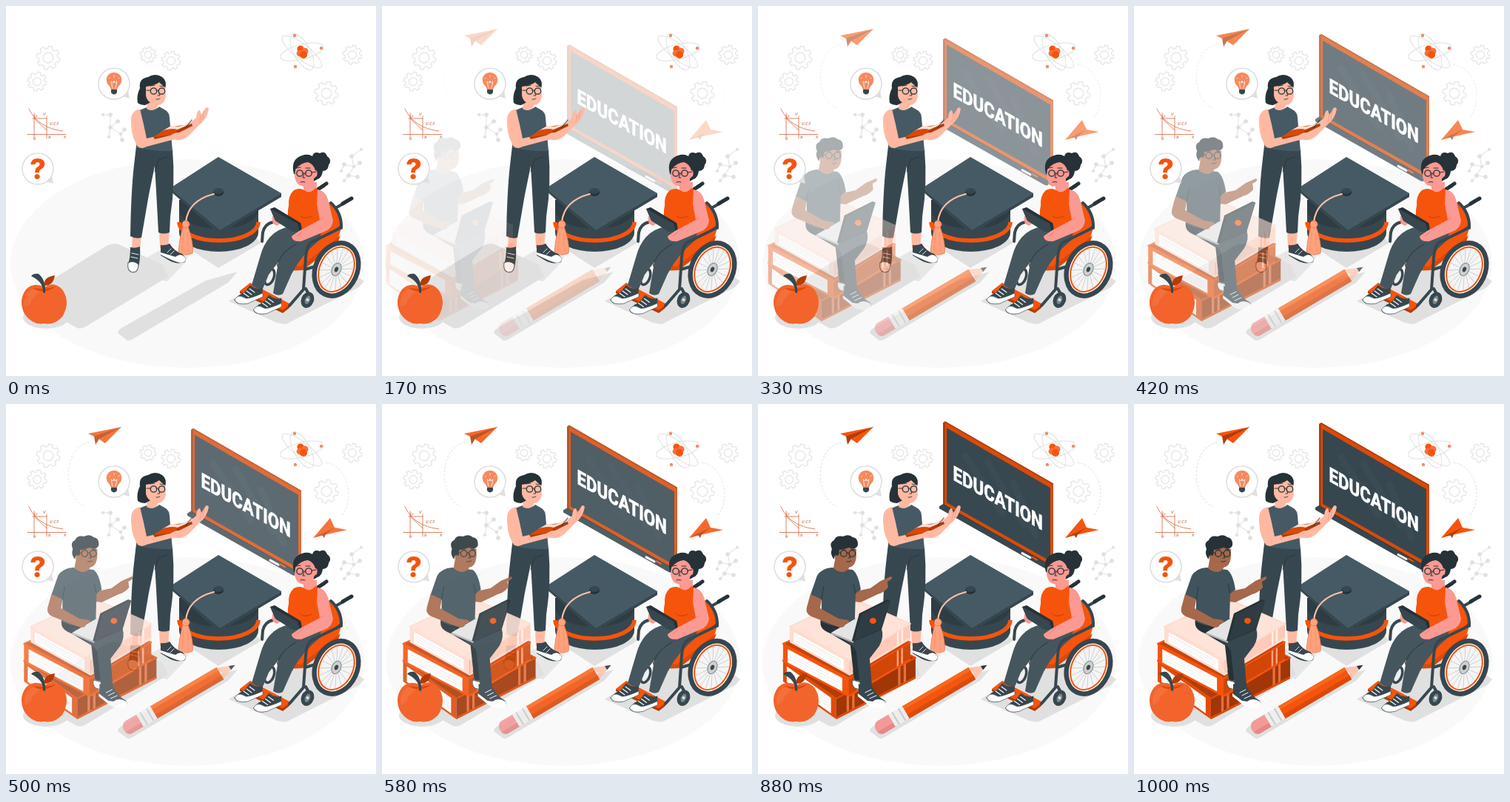
Write an HTML page that moves like this. It is 500x500 px and loops after 1040 ms.

```html
<!DOCTYPE html>
<html lang="en">
<head>
<meta charset="utf-8">
<title>Education</title>
<style>
html, body { margin: 0; width: 100%; height: 100%; overflow: hidden; background: #fff; }
svg { display: block; width: 100vw; height: 100vh; }
path, ellipse, circle, line { stroke-linecap: round; stroke-linejoin: round; }
.dark { fill: #37474f; }
.slate { fill: #455a64; }
.ink { fill: #263238; }
.org { fill: #f6540c; }
.burnt { fill: #d94a0a; }
.rust { fill: #b23c08; }
.peach { fill: #ffa27c; }
.pale { fill: #ffdccf; }
.white { fill: #fff; }
.shade { fill: #e0e0e0; }
.skinA { fill: #ffb9a3; }
.skinB { fill: #a6684c; }
.skinC { fill: #fb9a92; }
.grey { fill: none; stroke: #e0e0e0; }
.line { fill: none; stroke: #263238; }
.light { fill: none; stroke: #fff; }
.dash { fill: none; stroke: #dcdcdc; stroke-dasharray: 2 3; }
.tube { fill: none; stroke: #37474f; stroke-width: 4; }
.bubble { fill: #fff; stroke: #dedede; stroke-width: 1.6; }
.chalk { fill: none; stroke: #d9653d; stroke-width: .8; }
.note { font: italic 6px "Open Sans", sans-serif; fill: #b5502a; }
</style>
</head>
<body>
<svg viewBox="0 0 500 500">
<ellipse cx="245" cy="348" rx="239" ry="141" fill="#f9f9f9"/>

<g class="shade">
  <path d="M60 371L136 324Q144 320 152 322L212 350 219 366 108 433Q102 437 96 435L60 415Z"/>
  <path d="M165 354L215 326 247 338 240 349 218 372 170 362Z" opacity=".7"/>
  <path d="M232 318L287 354 345 320 330 305Z"/>
  <path d="M151 442Q152 437 158 434L270 371 313 359 300 374 178 446Q168 453 164 452Z"/>
  <path d="M301 399L340 375 400 345 450 348 484 372 477 380 378 430 366 428Z"/>
  <ellipse cx="54" cy="421" rx="31" ry="15"/>
</g>

<g id="gears" class="grey"></g>

<!-- atom -->
<g transform="translate(400 62)">
  <g class="grey">
    <ellipse rx="30" ry="10" transform="rotate(-14)"/>
    <ellipse rx="33" ry="10" transform="rotate(38)"/>
    <ellipse rx="27" ry="11" transform="rotate(62)"/>
  </g>
  <g class="org">
    <circle cx="-2" cy="-4" r="4.6"/><circle cx="4" cy="-1" r="4.6" fill="#f7703a"/>
    <circle cx="-3" cy="2" r="4.4" fill="#f7703a"/><circle cx="2" cy="4" r="5"/>
  </g>
  <g fill="#f08a68"><circle cx="-10" cy="-22" r="2.2"/><circle cx="26" cy="-5" r="2.2"/><circle cx="-9" cy="20" r="2.2"/></g>
</g>

<g id="molecules"></g>

<!-- graph -->
<path class="chalk" d="M31 139Q43 165 77 169M38 145V179M55 149V179M29 173.5H81M36 152H55M38 152L55 168"/>
<g class="note">
  <text x="59" y="161">V-C3</text><text x="50" y="148">V</text><text x="38" y="151">U</text>
  <text x="78" y="179">X</text><text x="37" y="181">o</text><text x="57" y="179">b</text>
</g>

<!-- paper planes -->
<g class="fade">
  <path class="dash" d="M112 52C76 60 76 125 106 138M432 79C465 85 471 130 453 152"/>
  <path class="org" d="M111 40L156 31 134 53 125 47Z"/>
  <path class="rust" d="M119 43.500L156 31 126 47 121 55Z"/>
  <path class="org" d="M415 181L438 154 444 167 461 170 430 177Z"/>
  <path class="rust" d="M415 181L444 167 432 176 430 181 427 177Z"/>
</g>

<!-- blackboard -->
<g id="board" class="fade">
  <path class="rust" d="M250 27L253 25 399 109V226L250 141Z"/>
  <path class="burnt" d="M253 27L399 111V226L253 141Z"/>
  <path class="dark" d="M255 34L395 115V214L255 135Z"/>
  <path fill="none" stroke="#455a64" stroke-width="9" opacity=".25" d="M280 72L330 150M310 80L360 165M345 108L375 180"/>
  <path class="dark" d="M245 140L250 137 392 218 392 224 388 224 245 143Z"/>
  <path d="M251 138L392 218" class="line" stroke-width=".8"/>
  <path d="M357 203.500L368 209.500" class="light" stroke-width="3"/>
  <path d="M371 209L377 212.500" stroke="#f6540c" stroke-width="2"/>
  <text transform="matrix(.81 .46 0 1 263.500 104)" font-family="Roboto, sans-serif" font-weight="700" font-size="27.500" fill="#fff" stroke="#fff" stroke-width=".8">EDUCATION</text>
</g>

<!-- graduation cap -->
<path class="dark" d="M234 262V306A53.500 26 0 0 0 341 306V262Z"/>
<path d="M234 292A53.500 25 0 0 0 341 292" fill="none" stroke="#f6540c" stroke-width="5.500" style="stroke-linecap:butt"/>
<path d="M234 276A53.500 25 0 0 0 341 276V262H234Z" class="ink" opacity=".5"/>
<path class="dark" d="M222 246V250L288 308 372 258V253L288 280Z"/>
<path class="slate" d="M222 246L287 204 372 253 289 302Z"/>
<path d="M222 246L289 302 372 253" fill="none" stroke="#546870" stroke-width=".7"/>
<ellipse cx="287" cy="252" rx="7" ry="5" class="ink"/>
<ellipse cx="287" cy="250" rx="6.500" ry="4" class="dark"/>
<path d="M281 254Q246 263 243 292" fill="none" stroke="#ffbfaa" stroke-width="2.200"/>
<path class="peach" d="M239 298H246Q254 322 252 334Q243 339 233 333Q234 317 239 298Z" stroke="#f0774e" stroke-width=".8"/>
<circle cx="243" cy="295" r="5" class="peach" stroke="#f0774e" stroke-width=".8"/>
<path d="M240 306L238 331M245 306L247 333" stroke="#f0906f" stroke-width=".8"/>

<!-- teacher -->
<g>
  <path class="skinA" d="M171 308H183L181 330H170ZM207 303H221L219 327H208Z"/>
  <path class="dark" d="M168 326Q175 328 181 325Q182 342 179 352Q178 361 171 360Q163 359 165 349Q168 340 168 326Z"/>
  <path class="white" d="M165 347Q172 343 179 349Q179 360 171 360Q163 358 165 347Z" stroke="#37474f" stroke-width=".8"/>
  <path class="dark" d="M209 323Q216 324 221 321Q228 332 238 335Q245 341 242 346Q230 350 219 343L209 337Z"/>
  <path class="white" d="M229 339Q236 333 242 340Q245 346 236 347Q228 346 209 336V333Z"/>
  <path class="light" stroke-width=".9" d="M170 334L179 336M169 339L178 341M218 333L223 328M222 336L227 331"/>
  <path class="dark" d="M176 189L225 194Q229 240 222 285L221 306Q213 309 206 306L203 250 201 216 193 255 183 313Q175 315 168 311Q169 250 173 215Z"/>
  <path class="line" d="M201 224L206 208L217 204" stroke-width=".8"/>
  <path class="skinA" d="M226 180Q236 184 246 176L262 160Q272 152 274 139Q271 134 268 141L264 147 262 141Q258 140 257 151L243 163 222 172Z"/>
  <path d="M264 147L262 157M268 141L266 153" fill="none" stroke="#ef9480" stroke-width=".8"/>
  <path class="slate" d="M190 137Q200 143 207 136L216 141Q221 145 221 151Q223 175 225 196Q198 197 176 191Q175 165 180 141Z"/>
  <path class="skinA" d="M191 124H205V136Q200 144 190 139Z"/>
  <path class="ink" d="M178 131Q176 121 181 111Q179 98 192 96Q202 90 211 96Q218 101 215 112L214 120 188 134Q182 134 178 131Z"/>
  <path class="skinA" d="M189 109Q202 107 207 103Q212 108 215 110L216 123Q213 134 205 134Q191 132 189 121Z"/>
  <path class="line" d="M190 114L195 114M203 114H206" stroke-width="1.200"/>
  <circle class="line" cx="199.500" cy="115" r="4.200" stroke-width="1.300"/>
  <circle class="line" cx="210.500" cy="115" r="4.200" stroke-width="1.300"/>
  <path class="line" d="M195 108L201 107M208 108L213 109M203 126Q206 127 208 125M206 116L208 121H205" stroke-width=".9"/>
  <path class="skinA" d="M181 139Q171 141 169 151Q168 172 176 187Q180 195 190 190L228 180Q237 176 234 171L228 170 190 179 186 160Z"/>
  <path class="rust" d="M199 177L220 164 251 159 252 162 230 173 201 180Z"/>
  <path class="pale" d="M211 169L223 162Q236 165 246 157L250 159 232 167Q220 165 211 169Z"/>
  <path class="burnt" d="M199 177L213 168Q222 165 232 167L228 174Z"/>
  <path class="skinA" d="M221 176Q230 169 237 172L234 178 226 181Z"/>
  <path d="M243 164L251 154" class="line" stroke-width="1.500" opacity=".6"/>
</g>

<!-- pencil -->
<g class="fade" transform="translate(172 432.500) rotate(-30.500)">
  <path class="org" d="M30 -9H136V10H30Z"/>
  <path fill="#f7691f" d="M30 -9H136V-4H30Z"/>
  <path class="burnt" d="M30 4H136V10H30Z"/>
  <path fill="#ffc3ae" d="M135 -9L158 1 135 10Q139 7 136 5Q140 0 136 -4Q138 -7 135 -9Z"/>
  <path class="ink" d="M151 -2.200L159 1 151 4Z"/>
  <path fill="#f29a98" d="M12 -9H-8Q-15 -7 -15 1Q-15 9 -8 10H12Z"/>
  <path fill="#e58885" d="M12 4H-14Q-13 9 -8 10H12Z"/>
  <path fill="#eee" d="M10 -9H32V10H10Z"/>
  <path d="M16 -9V10M26 -9V10" stroke="#c9c9c9" stroke-width="2" style="stroke-linecap:butt"/>
</g>

<!-- student on books -->
<g id="student">
  <g id="books"></g>
  <path class="skinB" d="M126 360H139V378L128 380Z"/>
  <path class="white" d="M126 373L137 376V386L129 384Q124 379 126 373Z" stroke="#37474f" stroke-width=".8"/>
  <path class="ink" d="M84 288Q78 304 96 310L123 326 128 372Q132 375 138 373L143 335 160 310 130 290Z"/>
  <path class="dark" d="M98 302L126 318 165 303Q169 315 162 327L149 344 152 380Q144 384 136 381L131 335Q128 326 118 322Z"/>
  <path class="dark" d="M134 378Q144 384 151 379Q158 395 170 401Q174 408 165 410Q150 411 144 402L134 394Z"/>
  <path class="white" d="M153 402Q160 396 170 402Q174 409 164 411Q150 411 143 403L133 395V391L146 401Z"/>
  <path class="light" d="M143 390L151 386M146 394L154 390M149 398L158 394" stroke-width="1"/>
  <path class="skinB" d="M129 253L136 252 150 249 164 239 178 233Q182 236 173 240L174 248Q168 255 160 257L137 268 128 267Z"/>
  <path fill="#41535c" d="M98 221Q84 222 78 232L69 258 84 265 84 294Q105 306 129 292L130 256 137 251Q134 230 126 224Z"/>
  <path class="line" d="M84 264L87 247M130 256L127 243" stroke-width=".8"/>
  <path class="skinB" d="M103 206H121V222Q113 232 100 222Z"/>
  <path class="skinB" d="M102 198Q115 190 131 196V206Q130 220 120 221Q106 220 102 208Z"/>
  <path class="ink" d="M101 210Q95 203 98 196Q94 187 101 184Q104 177 113 179Q121 175 126 180Q134 181 133 191Q130 198 121 194Q112 197 108 197L107 205Q101 202 101 210Z"/>
  <circle class="line" cx="114" cy="202" r="4.300" stroke-width="1.300"/>
  <circle class="line" cx="125.500" cy="202" r="4.300" stroke-width="1.300"/>
  <path class="line" d="M103 201L110 201M118 201H121M121 203L123 208H120M110 196H116M124 196L129 197M118 213Q121 214 124 212" stroke-width="1"/>
  <path fill="#e4e4e4" d="M97 309L130 290 165 304 127 321Z"/>
  <path fill="#bdbdbd" d="M97 309L127 321V323L97 311Z"/>
  <path class="ink" d="M125 320L135 283 173 264 177 266 165 305 128 321Z"/>
  <path fill="#2f3c43" d="M128 320L138 284 177 265 165 304Z"/>
  <ellipse cx="153.500" cy="293" rx="4.500" ry="4" class="org"/>
  <path class="skinB" d="M69 257L84 264 82 276 107 290 120 292Q124 295 116 297Q116 302 109 302Q102 300 98 298L70 287Q62 283 64 275Z"/>
</g>

<!-- speech bubbles -->
<path class="shade" d="M157 122L167 125 165 114ZM53 237L64 240 62 230Z"/>
<circle class="bubble" cx="146" cy="105" r="21"/>
<circle class="bubble" cx="43" cy="220" r="21"/>
<path fill="#f68a5f" d="M141.500 112Q141 109 138.500 107A10.300 10.300 0 1 1 153.500 107Q151 109 150.500 112Z"/>
<path class="light" d="M144 111L142 102L145 104L146 101L147 104L150 102L148 111M146 96V94M140 98L139 97M152 98L153 97" stroke-width=".8"/>
<path class="dark" d="M142 112.500H150V117Q146 122 142 117Z"/>
<text x="43" y="233.500" text-anchor="middle" font-family="Inter, sans-serif" font-weight="800" font-size="38" fill="#f6540c">?</text>

<!-- apple -->
<path fill="#f2642c" d="M52 380Q65 371 76 383Q88 400 76 420Q65 432 52 429Q36 432 25 416Q16 398 27 383Q38 372 52 380Z"/>
<path fill="#f67a48" d="M29 388Q38 378 50 384Q40 388 34 400Q29 408 25 405Q24 396 29 388Z" opacity=".5"/>
<path d="M36 381Q51 391 67 379Q52 384 36 381Z" class="burnt"/>
<path class="dark" d="M50 387Q51 373 34 365Q37 361 44 362Q54 370 53 388Z"/>
<path class="rust" d="M52 378Q50 366 66 364Q64 378 52 378Z"/>

<!-- wheelchair user -->
<g>
  <ellipse cx="356" cy="366" rx="6" ry="11" transform="rotate(20 356 366)" fill="#eee" stroke="#37474f" stroke-width="3.500"/>
  <path class="org" d="M316 385L330 374 383 402 383 407 374 414Z"/>
  <path class="rust" d="M316 385L374 411 383 404V408L374 415 316 388Z"/>
  <path class="tube" d="M418 250L430 243M440 276L456 267"/>
  <path d="M421 248L433 240M455 267L467 260" class="line" stroke-width="5"/>
  <path class="org" d="M432 263L441 268Q455 280 454 297L447 320 400 356Q378 358 366 350L385 318Z"/>
  <path class="burnt" d="M366 348L398 352 452 310 448 321 401 357Q378 359 366 352Z"/>
  <path class="tube" d="M346 318L347 306Q350 294 361 292M439 266Q454 280 453 300"/>
  <path class="skinC" d="M402 238H420V252Q410 258 402 250Z"/>
  <path class="org" d="M389 249Q397 245 403 249Q411 255 418 246L425 251Q430 275 428 302Q405 310 383 300Q379 282 382 270Q381 256 389 249Z"/>
  <path fill="#46565e" d="M383 298Q352 304 343 340L332 377Q339 383 347 382L355 363 368 346 361 388Q368 393 374 389L386 362Q400 335 424 316L427 300Q405 306 383 298Z"/>
  <path class="line" d="M368 346Q375 330 392 322" stroke-width=".9"/>
  <g id="shoe">
    <path class="dark" d="M330 377Q338 384 347 381L346 393 327 402Q312 405 309 398Q312 391 322 387Z"/>
    <path class="white" d="M309 397Q313 389 322 394Q325 398 347 388V393L327 402Q312 405 309 397Z" stroke="#37474f" stroke-width=".6"/>
    <path class="light" d="M321 388L328 393M325 385L332 390M329 382L336 387" stroke-width="1.100"/>
  </g>
  <use href="#shoe" x="25.500" y="13.500"/>
  <path class="ink" d="M389 227Q384 207 400 202Q408 199 414 203Q416 196 424 199Q431 195 434 203Q441 208 436 215Q435 223 428 223Q427 232 421 234L414 238Z"/>
  <path class="skinC" d="M391 221Q398 212 408 211Q416 214 418 222Q422 222 420 230Q415 232 416 237Q411 244 402 244Q391 242 390 230Z"/>
  <circle class="line" cx="397" cy="226" r="4.200" stroke-width="1.300"/>
  <circle class="line" cx="409" cy="226" r="4.200" stroke-width="1.300"/>
  <path class="line" d="M401 226H405M413 225L419 224M403 227L401 232H404M393 219L398 218M405 219L411 219M398 238Q401 237 404 238" stroke-width="1"/>
  <path class="skinC" d="M360 284Q366 279 372 284L374 292 366 297Q358 295 360 284Z"/>
  <path class="ink" d="M357 274L363 272 398 293Q401 300 398 306L386 304 364 290Z"/>
  <path class="dark" d="M357 274L394 294 397 306 386 304 364 290Z"/>
  <path class="skinC" d="M421 248Q433 250 436 265L442 290Q441 301 430 305L399 318Q386 319 386 311L396 304 424 289 420 268Z"/>
  <path d="M424 289L429 286M400 305L393 311" fill="none" stroke="#e07766" stroke-width=".8"/>
  <path d="M398 284Q405 289 413 284" fill="none" stroke="#b23c08" stroke-width=".8"/>
  <path class="tube" d="M453 297Q452 300 446 303L413 319Q406 324 405 340L402 383 383 405M404 356L428 349M405 382L409 389"/>
  <g transform="translate(446.500 356) rotate(25)">
    <ellipse rx="28" ry="37" fill="#fff" stroke="#37474f" stroke-width="6.500"/>
    <ellipse rx="22.500" ry="31.500" fill="#f5f5f5" stroke="#f6540c" stroke-width="2"/>
    <g id="spokes" stroke="#c4c4c4" stroke-width=".7"></g>
    <ellipse rx="6" ry="9" fill="#cfcfcf" stroke="#78868c"/>
    <ellipse rx="2.500" ry="3.500" class="dark"/>
  </g>
  <ellipse cx="407.500" cy="397" rx="6" ry="8.500" transform="rotate(22 407 397)" fill="#78868c" stroke="#37474f" stroke-width="5"/>
  <circle cx="407.500" cy="397" r="2" fill="#e0e0e0"/>
</g>
</svg>

<script>
const $ = id => document.getElementById(id);
const polar = (r, a) => `${(r * Math.cos(a)).toFixed(2)} ${(r * Math.sin(a)).toFixed(2)}`;

function gear(x, y, r) {
  const teeth = 8, step = 2 * Math.PI / teeth;
  let d = "";
  for (let i = 0; i < teeth; i++) {
    const a = i * step;
    d += `${i ? "L" : "M"}${polar(r * .78, a - .25)}L${polar(r, a - .17)}L${polar(r, a + .17)}L${polar(r * .78, a + .25)}`;
  }
  return `<g transform="translate(${x} ${y}) rotate(12)"><path d="${d}Z"/><circle r="${r * .43}"/></g>`;
}
$("gears").innerHTML = [[57, 70, 16], [42, 102, 13], [192, 66, 11], [223, 74, 13], [433, 118, 16], [468, 66, 13]]
  .map(g => gear(...g)).join("");

// Each chain is a run of bonded nodes.
const chains = [
  [[131, 147], [141, 147], [141, 164], [151, 156]],
  [[139, 177], [141, 164], [155, 173], [160, 167]],
  [[155, 173], [157, 181]],
  [[480, 194], [467, 203], [470, 217], [463, 229], [457, 236]],
  [[453, 223], [457, 214], [470, 217], [478, 212]],
  [[463, 229], [475, 231]]
];
$("molecules").innerHTML = chains.map(c => `<polyline class="grey" points="${c.join(" ")}"/>` +
  c.map(([x, y], i) => `<circle class="shade" cx="${x}" cy="${y}" r="${i % 2 ? 2.8 : 2.1}"/>`).join("")).join("");

$("spokes").innerHTML = Array.from({ length: 18 }, (_, i) => {
  const a = i * Math.PI / 9;
  return `<line x2="${21 * Math.cos(a)}" y2="${30 * Math.sin(a)}"/>`;
}).join("");

// Corners are left, front, right and back of the cover; h is the thickness.
function book(l, f, r, b, h, top, edge, spine, band) {
  const at = (p, q, k, dy) => `${p[0] + (q[0] - p[0]) * k} ${p[1] + (q[1] - p[1]) * k + dy}`;
  const face = (p, q, k0, k1, y0, y1, fill) =>
    `<path fill="${fill}" d="M${at(p, q, k0, y0)}L${at(p, q, k1, y0)}L${at(p, q, k1, y1)}L${at(p, q, k0, y1)}Z"/>`;
  const bands = [.13, .2, .78, .85].map(k => face(f, r, k, k + .03, 1, h - 1, band)).join("");
  const leaves = [.35, .5, .65].map(k => face(l, f, .1, .85, h * k, h * k + .6, "#dedede")).join("");
  return face(l, f, 0, 1, 0, h, edge) + face(l, f, .07, .9, 4, h - 3, "#fff") + leaves +
    face(f, r, 0, 1, 0, h, spine) + bands + face(f, r, 0, 1, h - 3, h, edge) +
    `<path fill="${top}" stroke="${edge}" stroke-width="2" d="M${l}L${f}L${r}L${b}Z"/>`;
}
$("books").innerHTML =
  book([32, 347], [104, 398], [211, 343], [125, 300], 28, "#b23c08", "#e04c0a", "#a13607", "#e8703c") +
  book([32, 324], [121, 371], [204, 322], [118, 285], 25, "#c8430a", "#f6540c", "#d04708", "#ffa27c") +
  book([41, 301], [122, 346], [204, 297], [124, 262], 21, "#ffe3d8", "#ffdccf", "#ffcbb8", "#fff0e9");

function bezier(x1, y1, x2, y2) {
  const curve = (a, b, s) => 3 * a * s * (1 - s) ** 2 + 3 * b * s * s * (1 - s) + s ** 3;
  return x => {
    let lo = 0, hi = 1;
    for (let i = 0; i < 30; i++) {
      const mid = (lo + hi) / 2;
      if (curve(x1, x2, mid) < x) lo = mid; else hi = mid;
    }
    return curve(y1, y2, hi);
  };
}
const slide = bezier(.36, -.01, .5, 1.38);
const ease = bezier(.25, .1, .25, 1);
const LOOP = 1040, FPS = 24, TRAVEL = 30;
const fades = document.querySelectorAll(".fade");

function draw(now) {
  const t = Math.min(1, Math.floor((now % LOOP + 4) * FPS / 1000) / FPS);
  const p = t && slide(t), shown = t && ease(t);
  const rest = TRAVEL * (1 - p);
  fades.forEach(el => el.setAttribute("opacity", shown));
  $("board").setAttribute("transform", `translate(0 ${rest})`);
  $("student").setAttribute("transform", `translate(${-rest} 0)`);
  $("student").setAttribute("opacity", Math.min(1, p));
}
const start = performance.now();
function tick() {
  draw(performance.now() - start);
  requestAnimationFrame(tick);
}
tick();
</script>
</body>
</html>
```
